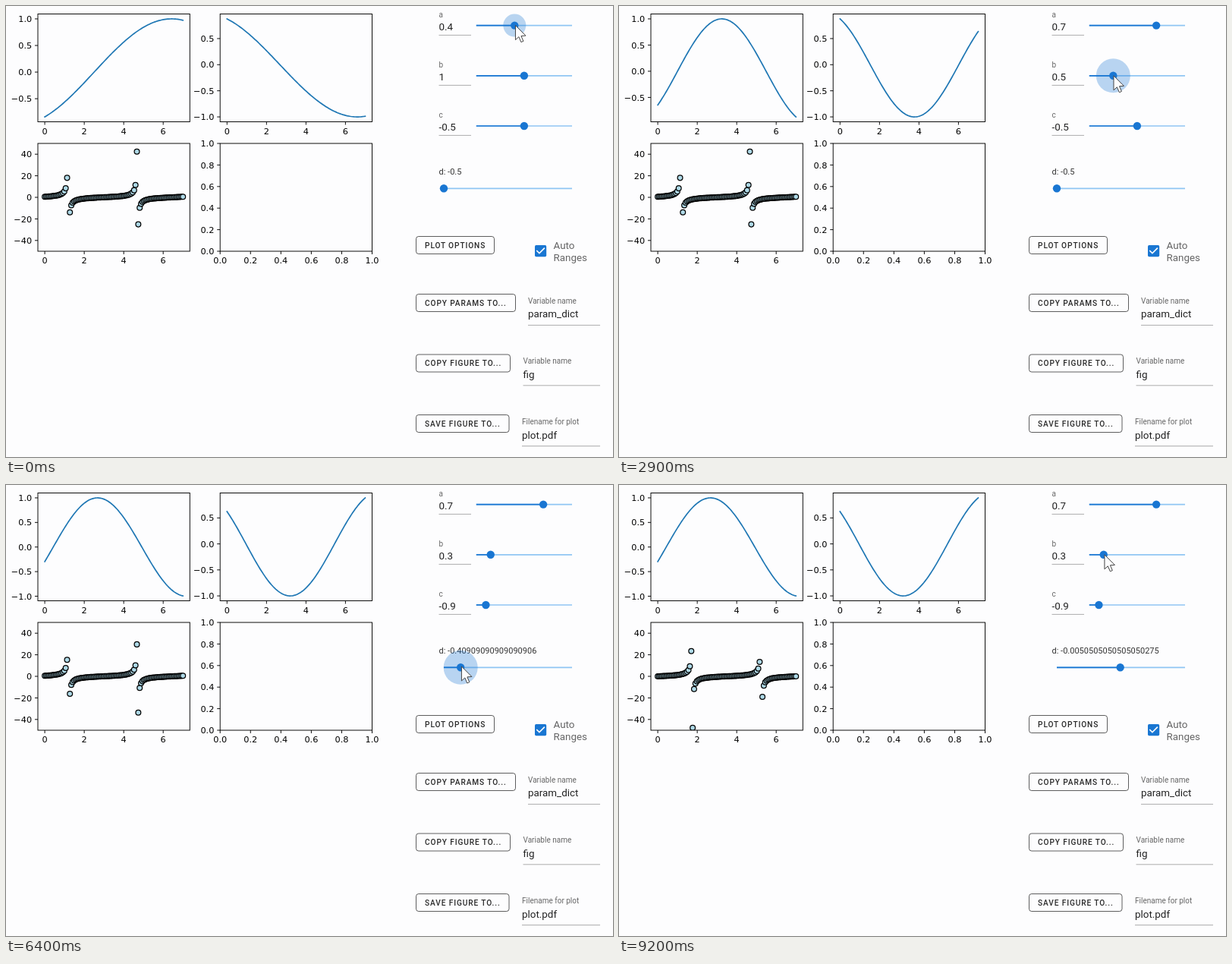
An HTML page that plays this animation: 800x594 px, repeating every 9900 ms.

```html
<!DOCTYPE html>
<html lang="en">
<head>
<meta charset="utf-8">
<title>Plot controls</title>
<style>
  html, body { margin: 0; width: 100%; height: 100%; overflow: hidden; background: #fdfdfe; }
  svg { display: block; width: 800px; height: 594px; font-family: Roboto, sans-serif; }
  .tick { font: 11.3px "DejaVu Sans", sans-serif; }
  .label { font-size: 10px; fill: rgba(0,0,0,.6); }
  .value { font-size: 13.4px; fill: rgba(0,0,0,.87); }
  .check { font-size: 13.4px; fill: rgba(0,0,0,.6); }
  .readout { font-size: 11px; fill: rgba(0,0,0,.8); }
  .button { font-size: 10.15px; font-weight: 500; letter-spacing: .0893em; fill: rgba(0,0,0,.84); }
</style>
</head>
<body>
<svg viewBox="0 0 800 594">
  <defs><clipPath id="clip"><rect x="42" y="181" width="200" height="142"/></clipPath></defs>
  <g id="still"></g>
  <g id="live"></g>
</svg>
<script>
const LOOP = 9900, END = 9200, STEP = 100;
const PLOT_LAG = 280, TEXT_LAG = 100, FADE = 200, TRAVEL = 700;
const W = 200.3, H = 142, BLUE = '#1976d2', TRACK_END = 746;

// Eased progress from 0 to 1 between two times; power 1 is linear.
const ease = (t, from, to, power = 1.6) =>
  1 - (1 - Math.min(1, Math.max(0, (t - from) / (to - from)))) ** power;

// Each slider is dragged once; positions count steps along the track.
const sliders = [
  { x: 619.8, y: 25.6, steps: 10, value: n => n / 10,
    press: 0, release: 1200, pos: t => 4 + 3 * ease(t, 0, 1200, 1) },
  { x: 619.8, y: 91.8, steps: 20, value: n => n / 10,
    press: 2100, release: 3200, pos: t => 10 - 7 * ease(t, 2100, 3200, 1) },
  { x: 619.8, y: 158, steps: 10, value: n => n / 10 - 1,
    press: 4100, release: 5200, pos: t => 5 - 4 * ease(t, 4100, 5200, 1) },
  { x: 577, y: 240.3, steps: 99, value: n => -0.5 + n * (1 / 99), lift: 9,
    press: 6100, release: 8100, pos: t => 46 * ease(t, 6100, 7700) + 3 * ease(t, 7900, 8000) }
];
const notch = (s, t) => Math.round(s.pos(t) + 1e-6);
const values = t => sliders.map(s => s.value(notch(s, t)));
const along = (s, n) => s.x + (TRACK_END - s.x) * n / s.steps;

const text = (cls, x, y, s, anchor = 'start') =>
  `<text class="${cls}" x="${x}" y="${y}" text-anchor="${anchor}">${s}</text>`;
const line = (x1, y1, x2, y2, stroke, width) =>
  `<path d="M${x1} ${y1}L${x2} ${y2}" stroke="${stroke}" stroke-width="${width}"/>`;
const circle = (x, y, r, style = '') => `<circle cx="${x}" cy="${y}" r="${r}" ${style}/>`;
const underline = (x1, x2, y) => line(x1, y, x2, y, 'rgba(0,0,0,.38)', .85);

const xs = Array.from({ length: 100 }, (_, i) => 7 * i / 99);
const px = (left, x) => left + (x + .35) / 7.7 * W;

const frame = (x, y) =>
  `<rect x="${x}" y="${y}" width="${W}" height="${H}" fill="none" stroke="#000" stroke-width=".95"/>`;
const tickX = (x, bottom, s) =>
  line(x, bottom, x, bottom + 4, '#000', .95) + text('tick', x, bottom + 16.2, s, 'middle');
const tickY = (left, y, s) =>
  line(left - 4, y, left, y, '#000', .95) +
  text('tick', left - 7.8, y + 4.1, String(s).replace('-', '\u2212'), 'end');
const ticksX = (left, bottom) => [0, 2, 4, 6].map(v => tickX(px(left, v), bottom, v)).join('');

function curve(left, top, f) {
  const ys = xs.map(f), lo = Math.min(...ys), hi = Math.max(...ys);
  const pad = (hi - lo) * .05, scale = H / (hi - lo + 2 * pad);
  const py = y => top + (hi + pad - y) * scale;
  const pts = ys.map((y, i) => `${px(left, xs[i]).toFixed(2)},${py(y).toFixed(2)}`).join(' ');
  const ticks = [-1, -.5, 0, .5, 1].filter(v => v >= lo - pad && v <= hi + pad);
  return `<polyline points="${pts}" fill="none" stroke="#1f77b4" stroke-width="1.7" stroke-linejoin="round" stroke-linecap="square"/>` +
    ticks.map(v => tickY(left, py(v), v.toFixed(1))).join('') + frame(left, top);
}

function scatter(d) {
  const dots = xs.map(x => [x, Math.tan(2 * Math.PI * x / 7 - d)])
    .filter(([, y]) => Math.abs(y) < 60)
    .map(([x, y]) => circle(px(42, x).toFixed(2), (252 - 1.42 * y).toFixed(2), 3.4));
  return `<g clip-path="url(#clip)"><g fill="#add8e6" stroke="#000" stroke-width="1.25">${dots.join('')}</g></g>` +
    frame(42, 181);
}

// The halo grows on hover, grows again on press and closes on release.
const halo = (s, t) =>
  15 * ease(t, s.press - FADE, s.press) + 7.5 * ease(t, s.press, s.press + FADE) -
  22.5 * ease(t, s.release, s.release + FADE);

function slider(s, t) {
  const x = along(s, notch(s, t)), r = halo(s, t);
  return line(s.x, s.y, TRACK_END, s.y, '#90c6f3', 1.7) + line(s.x, s.y, x, s.y, BLUE, 1.7) +
    (r > 0 ? circle(x, s.y, r, `fill="${BLUE}" opacity=".3"`) : '') +
    circle(x, s.y, 5.2, `fill="${BLUE}"`);
}

// The pointer follows the handle, then glides to the next slider.
function cursor(t) {
  const hold = s => [along(s, s.pos(t)) + 1.2, s.y - (s.lift || 0) * ease(t, s.press, s.release, 1)];
  const i = Math.max(0, sliders.findIndex(s => t < s.release + TRAVEL));
  const s = sliders[i], next = sliders[i + 1];
  if (!next && t > s.release + 2 * FADE) return '';
  const p = hold(s), q = hold(next || s), k = ease(t, s.release, s.release + TRAVEL, 3);
  return `<path transform="translate(${p.map((v, j) => v + (q[j] - v) * k)})"
    d="M0 0V19L4.4 15L7.4 22L10.4 20.7L7.5 13.9L13.5 13.5Z" fill="#fdfdfe" stroke="#444" stroke-width="1"/>`;
}

const button = (y, w, s) =>
  `<rect x="540.5" y="${y - 11.5}" width="${w}" height="23" rx="3.3" fill="none" stroke="rgba(0,0,0,.7)" stroke-width=".9"/>` +
  text('button', 552, y + 3.6, s);
const field = (x, y, label, value) =>
  text('label', x, y, label) + text('value', x, y + 18.6, value) + underline(x, 783, y + 28.6);

function still() {
  let s = ticksX(42, 152.5) + ticksX(282.2, 152.5) + ticksX(42, 323) + frame(282.2, 181);
  for (let v = -40; v <= 40; v += 20) s += tickY(42, 252 - 1.42 * v, v);
  for (let i = 0; i < 6; i++) {
    const v = (i / 5).toFixed(1);
    s += tickX(282.2 + W * i / 5, 323, v) + tickY(282.2, 323 - H * i / 5, v);
  }
  [...'abc'].forEach((name, i) => {
    s += text('label', 570.5, 15 + 66 * i, name) + underline(570.5, 613, 38.4 + 66 * i);
  });
  s += button(315, 103, 'PLOT OPTIONS') + button(391, 131, 'COPY PARAMS TO...') +
    button(470.5, 124, 'COPY FIGURE TO...') + button(550, 122.5, 'SAVE FIGURE TO...');
  s += `<rect x="697" y="315" width="15.2" height="15.2" rx="1.7" fill="${BLUE}"/>
    <path transform="translate(694.5 312.5) scale(.84)" fill="#fdfdfe"
      d="M10 17L5 12L6.41 10.58L10 14.17L17.59 6.58L19 8Z"/>`;
  s += text('check', 721.5, 319.5, 'Auto') + text('check', 721.5, 336.2, 'Ranges');
  return s + field(688, 391.8, 'Variable name', 'param_dict') +
    field(681.5, 471.2, 'Variable name', 'fig') + field(680, 551, 'Filename for plot', 'plot.pdf');
}

function live(t) {
  const [a, b, c, d] = values(t - PLOT_LAG);
  return curve(42, 10.5, x => Math.sin(a * x - b)) +
    curve(282.2, 10.5, x => Math.cos(a * x - c)) +
    scatter(d) +
    values(t).slice(0, 3).map((v, i) => text('value', 570.5, 32.2 + 66 * i, +v.toFixed(1))).join('') +
    text('readout', 570.5, 222.2, 'd: ' + values(t - TEXT_LAG)[3]) +
    sliders.map(s => slider(s, t)).join('') +
    cursor(t);
}

document.getElementById('still').innerHTML = still();
const stage = document.getElementById('live'), start = performance.now();
let shown = -1;
function tick() {
  const now = (performance.now() - start) % LOOP;
  const t = Math.min(END, Math.floor(now / STEP) * STEP);
  if (t !== shown) stage.innerHTML = live(shown = t);
  requestAnimationFrame(tick);
}
tick();
</script>
</body>
</html>
```
